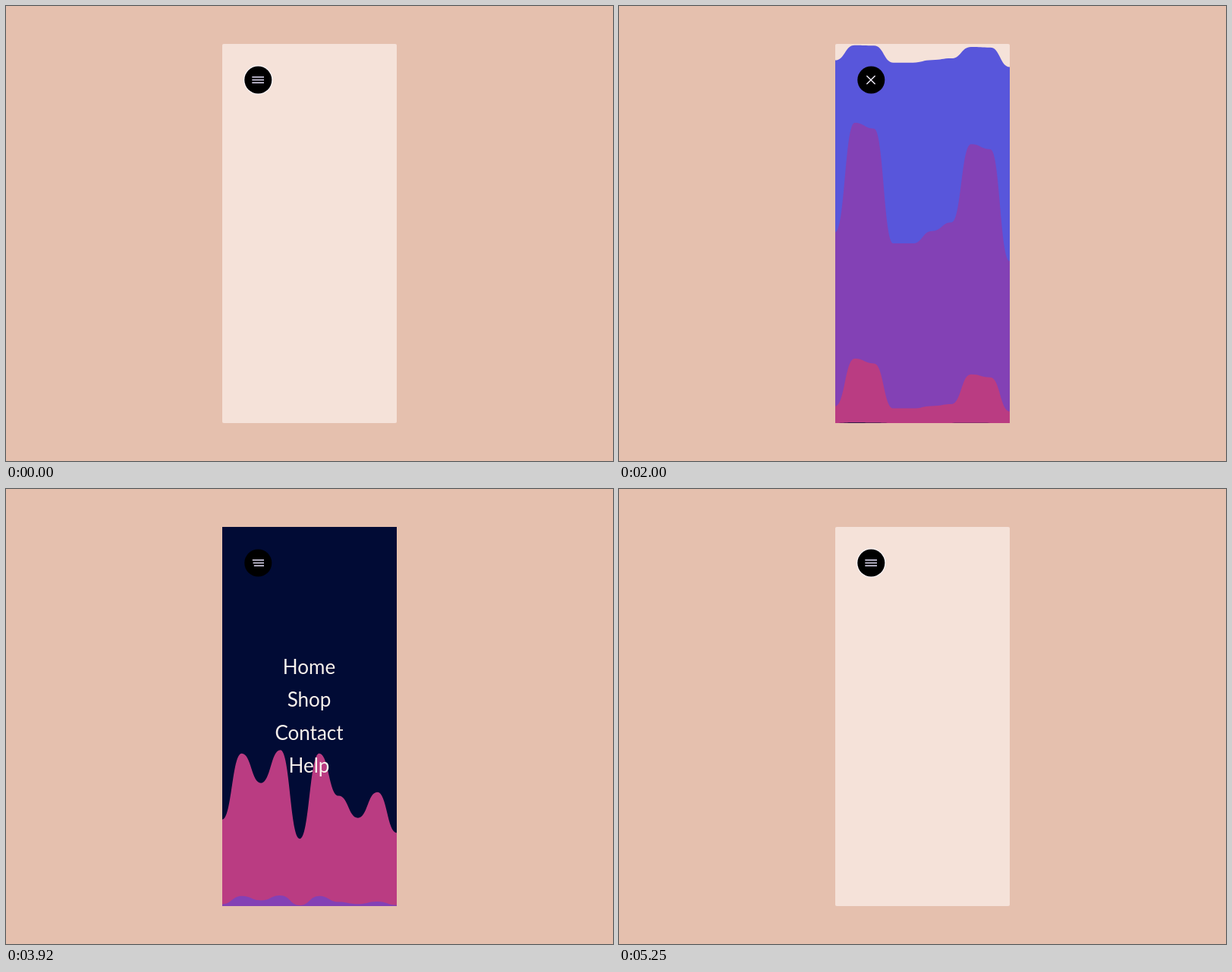
An HTML page with a canvas for the animation above (6750 ms loop, 800 by 600 pixels).

```html
<!DOCTYPE html>
<html lang="en">
<head>
<meta charset="utf-8">
<title>Overlay menu</title>
<style>
  html, body { margin: 0; width: 100%; height: 100%; overflow: hidden; background: #e5c0ae; }
  canvas { display: block; width: 800px; height: 600px; }
</style>
</head>
<body>
<canvas id="stage" width="800" height="600"></canvas>
<script>
const ctx = document.getElementById('stage').getContext('2d');
const LOOP = 6750, FPS = 12;
const PANEL = { x: 285, y: 50, w: 230, h: 500 };
const LAYERS = ['#5856db', '#8341b5', '#ba3c82', '#010b35'];
const DURATION = 900, LAYER_DELAY = 250;
const OPEN_DELAYS = [113, 0, 8, 122, 122, 112, 105, 28, 34, 137];
const CLOSE_DELAYS = [75, 3, 32, 0, 103, 3, 46, 73, 42, 94];
const ITEMS = ['Home', 'Shop', 'Contact', 'Help'];
const ITEM_HEIGHT = 43.4;

// Pointer paths: time, x, y
const POINTER_PATHS = [
  [[416, 501, 159], [1000, 322, 97], [1083, 314, 96], [1250, 312, 97], [1583, 308, 109], [1840, 308, 109]],
  [[2580, 310, 106], [2750, 325, 99], [3500, 329, 98], [3600, 329, 98]]
];

const clamp = v => Math.min(1, Math.max(0, v));
const lerp = (a, b, p) => a + (b - a) * p;
const cubicInOut = u => u < 0.5 ? 4 * u ** 3 : 1 - 4 * (1 - u) ** 3;
const easeOut = (u, power) => 1 - (1 - clamp(u)) ** power;

const openStart = t => 1204 - 18 * clamp((t - 1583) / 417);
const closeStart = t => 3495 + 7 * clamp((t - 3917) / 666);

function drawLayer(color, elapsed, delays, closing) {
  const { x, y, w, h } = PANEL;
  const ys = delays.map(d => y + h * (1 - cubicInOut(clamp((elapsed - d) / DURATION))));
  const step = w / (ys.length - 1);
  const edge = closing ? y : y + h;
  ctx.fillStyle = color;
  ctx.beginPath();
  ctx.moveTo(x, edge);
  ctx.lineTo(x, ys[0]);
  for (let i = 1; i < ys.length; i++) {
    const px = x + i * step, mid = px - step / 2;
    ctx.bezierCurveTo(mid, ys[i - 1], mid, ys[i], px, ys[i]);
  }
  ctx.lineTo(x + w, edge);
  ctx.fill();
}

function drawLayers(t) {
  const closing = t >= closeStart(t);
  const elapsed = t - (closing ? closeStart(t) : openStart(t));
  if (elapsed < 0 || t >= 5249) return;
  LAYERS.forEach((color, i) => {
    const order = closing ? LAYERS.length - 1 - i : i;
    drawLayer(color, elapsed - order * LAYER_DELAY, closing ? CLOSE_DELAYS : OPEN_DELAYS, closing);
  });
}

function drawMenu(t) {
  const fade = 1 - cubicInOut(clamp((t - 3930) / 400));
  ctx.font = '400 26px Lato, sans-serif';
  ctx.textAlign = 'center';
  ctx.textBaseline = 'alphabetic';
  ctx.fillStyle = '#f8f1ec';
  ITEMS.forEach((label, i) => {
    const p = easeOut((t - 2211 - 50 * i) / 1000, 4);
    ctx.globalAlpha = p * fade;
    ctx.fillText(label, 399.5, 244 + ITEM_HEIGHT * (i + 1 - p));
  });
  ctx.globalAlpha = 1;
}

function drawStroke(x1, y1, x2, y2, amount) {
  if (amount <= 0) return;
  ctx.beginPath();
  ctx.moveTo(x1, y1);
  ctx.lineTo(lerp(x1, x2, amount), lerp(y1, y2, amount));
  ctx.stroke();
}

function drawButton(t) {
  const idle = t < 1160 || t >= 5249;
  if (idle) {
    ctx.fillStyle = '#fdf8fb';
    ctx.beginPath();
    ctx.arc(332.3, 97.5, 19.2, 0, 2 * Math.PI);
    ctx.fill();
  }
  ctx.fillStyle = '#000';
  ctx.beginPath();
  ctx.arc(332.3, 97.5, 18, 0, 2 * Math.PI);
  ctx.fill();

  const opened = t - openStart(t), closed = t - closeStart(t);
  ctx.strokeStyle = '#e6e0fa';
  ctx.lineWidth = 1.5;
  [93.7, 97.5, 101.2].forEach((y, i) => {
    const amount = closed < 0
      ? 1 - easeOut((opened - 40 * i) / 200, 3)
      : easeOut((closed - 150 - 45 * i) / 400, 3);
    drawStroke(340, y, 324.3, y, amount);
  });
  ctx.strokeStyle = '#f4f0fc';
  ctx.lineWidth = 1.4;
  [[92, 103], [103, 92]].forEach(([y1, y2], i) => {
    const grow = easeOut((opened - 212 - 60 * i) / 300, 3);
    const shrink = easeOut((closed - 40 * i) / 200, 3);
    drawStroke(326.4, y1, 337.6, y2, grow * (1 - shrink));
  });
}

function drawPointer(t) {
  const path = POINTER_PATHS.find(p => t >= p[0][0] && t <= p[p.length - 1][0]);
  if (!path) return;
  const i = Math.max(1, path.findIndex(k => k[0] >= t));
  const [a, b] = [path[i - 1], path[i]];
  const u = clamp((t - a[0]) / (b[0] - a[0]));
  const p = u * u * (3 - 2 * u);
  const onDark = path === POINTER_PATHS[1];
  ctx.beginPath();
  ctx.arc(lerp(a[1], b[1], p), lerp(a[2], b[2], p), onDark ? 3.7 : 2.9, 0, 2 * Math.PI);
  ctx.fillStyle = onDark ? 'rgba(150,100,200,.08)' : 'rgba(170,90,170,.45)';
  ctx.fill();
  ctx.strokeStyle = onDark ? 'rgba(190,165,235,.85)' : 'rgba(155,95,180,.75)';
  ctx.lineWidth = 1;
  ctx.stroke();
}

function draw(t) {
  const { x, y, w, h } = PANEL;
  ctx.fillStyle = '#e5c0ae';
  ctx.fillRect(0, 0, 800, 600);
  ctx.fillStyle = '#f5e2d9';
  ctx.beginPath();
  ctx.roundRect(x, y, w, h, 2);
  ctx.fill();
  drawLayers(t);
  drawMenu(t);
  drawButton(t);
  drawPointer(t);
}

// Steps at 12 per second, with each change rounded to 10 ms
function stepAt(t) {
  let k = Math.ceil(t * FPS / 1000) + 1;
  while (Math.round(k * 100 / FPS) * 10 > t) k--;
  return k;
}

const begin = performance.now();
function tick() {
  const t = (performance.now() - begin) % LOOP;
  draw(stepAt(t) * 1000 / FPS);
  requestAnimationFrame(tick);
}
tick();
</script>
</body>
</html>
```
